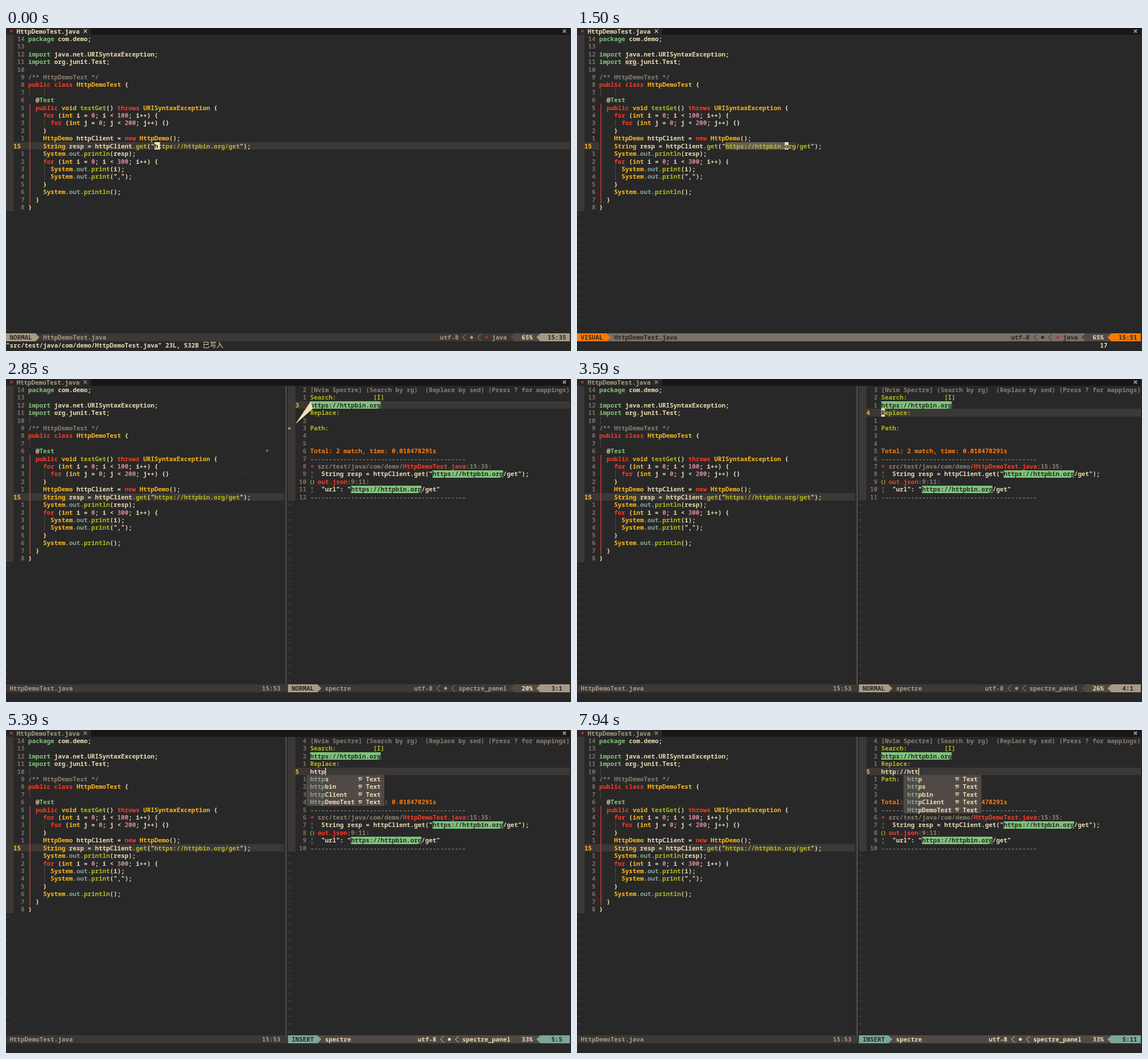
Animation, 990 px wide and 566 px high, one loop 8000 ms. Source, as an HTML page with a canvas:

```html
<!DOCTYPE html>
<html lang="en">
<head>
<meta charset="utf-8">
<title>Editor search and replace</title>
<style>
html, body { margin: 0; width: 100%; height: 100%; overflow: hidden; background: #282828; }
canvas { display: block; }
</style>
</head>
<body>
<canvas id="stage" width="990" height="566"></canvas>
<script>
(() => {
const g = document.getElementById('stage').getContext('2d');
const LOOP = 8000, CW = 6.5, RH = 13.415, COLS = 152;
const FONT = '600 10.833px "Noto Sans Mono", "DejaVu Sans Mono", monospace';
const BG = '#282828', BG1 = '#3c3836', BG2 = '#504945', BG3 = '#665c54', FG = '#ebdbb2';
const HIT = '#7fc37a', CURSOR = '#f3dfb4', JAVA = '#a5343b';
const INK = {
  f: FG, r: '#fb3a26', y: '#fdb81f', g: '#b4b81f', a: '#83c07a', b: '#83a598', p: '#d3869b',
  c: '#8b7d70', n: '#7c6f64', o: '#fe7a0e', d: '#282828', s: '#a89984'
};
const SITE = 'https://httpbin.org';

// "~x" switches the ink to colour x
const CODE = [
  '~apackage ~fcom.demo;',
  '',
  '~aimport ~fjava.net.URISyntaxException;',
  '~aimport ~forg.junit.Test;',
  '',
  '~c/** HttpDemoTest */',
  '~rpublic class ~yHttpDemoTest ~f{',
  '',
  '  @~aTest',
  '  ~rpublic ~yvoid ~gtestGet~f() ~rthrows ~yURISyntaxException ~f{',
  '    ~rfor ~f(~yint ~fi = ~p0~f; i < ~p100~f; i++) {',
  '      ~rfor ~f(~yint ~fj = ~p0~f; j < ~p200~f; j++) {}',
  '    }',
  '    ~yHttpDemo ~fhttpClient = ~rnew ~yHttpDemo~f();',
  '    ~yString ~fresp = httpClient~b.~gget~f("~g' + SITE + '/get~f");',
  '    ~ySystem~b.out.~gprintln~f(resp);',
  '    ~rfor ~f(~yint ~fi = ~p0~f; i < ~p300~f; i++) {',
  '      ~ySystem~b.out.~gprint~f(i);',
  '      ~ySystem~b.out.~gprint~f(",");',
  '    }',
  '    ~ySystem~b.out.~gprintln~f();',
  '  }',
  '}'
];
const RULE = '~c' + '-'.repeat(42);
const PANEL = [
  '~c[Nvim Spectre] (Search by rg)  (Replace by sed) (Press ? for mappings)',
  '~gSearch:          [I]',
  '~d' + SITE,
  '~gReplace:',
  '',
  '~gPath:',
  '',
  '',
  '~oTotal: 2 match, time: 0.018478291s',
  RULE,
  '  ~csrc/test/java/com/demo/~rHttpDemoTest.java~c:15:35:',
  '~c¦  ~fString resp = httpClient.get("~d' + SITE + '~f/get");',
  '  ~rout.json~c:9:11:',
  '~c¦  ~f"url": "~d' + SITE + '~f/get"',
  RULE
];
const WORDS = ['http', 'https', 'httpbin', 'httpClient', 'HttpDemoTest'];
const MODES = {
  NORMAL: { main: '#a89984', bar: BG1, ink: 's' },
  VISUAL: { main: '#ff7800', bar: '#7c6f64', ink: 'd' },
  INSERT: { main: '#7ba698', bar: BG2, ink: 'f' }
};

// Each list holds [start time, value]
const leftCol = [[0, 34], [750, 39], [900, 42], [1200, 49], [1500, 50], [1800, 52]];
const panelRow = [[0, 3], [3590, 4], [4040, 5]];
const typed = [[0, 0], [4490, 1], [4640, 2], [4940, 3], [5090, 4], [6590, 5], [6890, 6], [7040, 7], [7340, 8], [7790, 9], [7940, 10]];
const pending = [[0, ''], [300, 'v'], [600, null], [2400, '<20>'], [2550, '<20>s']];
const at = (list, t) => list.reduce((v, [start, next]) => t >= start ? next : v, list[0][1]);

const rowY = row => row * RH - 1.2;
function rect(x, y, w, h, color) {
  g.fillStyle = color;
  g.fillRect(x, y, w, h);
}
function cells(col, row, n, color, rows = 1) {
  const y = Math.round(rowY(row));
  rect(col * CW, y, n * CW, Math.round(rowY(row + rows)) - y, color);
}
function put(col, row, text, ink = 'f') {
  for (const part of ('~' + ink + text).split('~').slice(1)) {
    const s = part.slice(1);
    g.fillStyle = INK[part[0]];
    g.fillText(s, col * CW, rowY(row) + 10.7);
    col += s.length;
  }
}
function trace(pts) {
  g.beginPath();
  pts.forEach(p => g.lineTo(...p));
}
function shape(color, ...pts) {
  g.fillStyle = color;
  trace(pts);
  g.fill();
}
function line(color, width, ...pts) {
  g.strokeStyle = color;
  g.lineWidth = width;
  trace(pts);
  g.stroke();
}
function dot(x, y, r, color) {
  g.fillStyle = color;
  g.beginPath();
  g.arc(x, y, r, 0, 7);
  g.fill();
}
function cross(x, y, r, color, width) {
  line(color, width, [x - r, y - r], [x + r, y + r]);
  line(color, width, [x - r, y + r], [x + r, y - r]);
}
function arrow(col, dir, color) {
  const x = col * CW, y = rowY(40), base = dir > 0 ? x : x + CW, tip = dir > 0 ? x + CW : x;
  shape(color, [base, y], [tip, y + RH / 2], [base, y + RH]);
}
function chevron(col, color) {
  const x = col * CW, y = rowY(40);
  line(color, 1, [x + CW, y + 1], [x + 1, y + RH / 2], [x + CW, y + RH - 1]);
}

function gutter(col, count, cur) {
  cells(col, 1, 2, BG1, count);
  for (let row = 1; row <= count; row++) {
    const n = String(Math.abs(row - cur));
    if (row === cur) put(col + 2, row, String(cur), 'y');
    else put(col + 6 - 1 - n.length, row, n, 'n');
  }
  g.fillStyle = BG2;
  for (let row = count + 1; row < 40; row++) g.fillText('~', col * CW, rowY(row) + 10.7);
}

function statusLine(col, mode, name, type, pct, pos) {
  const m = MODES[mode], color = INK[m.ink], end = mode === 'INSERT' ? 136 : 135;
  cells(col, 40, COLS - col, m.bar);
  cells(col, 40, 8, m.main);
  arrow(col + 8, 1, m.main);
  put(col + 1, 40, mode, 'd');
  put(col + 10, 40, name, m.ink);

  let c = end - type.length;
  put(c, 40, type, m.ink);
  if (type === 'java') {
    c -= 2;
    dot(c * CW + 3.5, rowY(40) + 6.7, 2.4, JAVA);
  }
  chevron(c - 2, color);
  dot((c - 4) * CW + 3.3, rowY(40) + 6.7, 2.6, color);
  chevron(c - 6, color);
  put(c - 12, 40, 'utf-8', m.ink);

  arrow(136, -1, BG2);
  cells(137, 40, 7, BG2);
  put(139, 40, pct + '%');
  arrow(143, -1, m.main);
  cells(144, 40, 8, m.main);
  put(pos[1] === ':' ? 147 : 146, 40, pos, 'd');
}

function tabLine(split) {
  rect(0, 0, COLS * CW, 12, '#171717');
  rect(0, 0, 149, 12, BG);
  dot(9.5, 5.5, 2.4, JAVA);
  put(18.5 / CW, 0, 'HttpDemoTest.java', split ? 's' : 'f');
  cross(139, 5.5, 2.8, split ? INK.s : FG, 1.2);
  cross(978.5, 5.5, 2.6, INK.s, 2);
}

function guides(split) {
  const bar = (x, row, n, color, w = 1) => rect(x, rowY(row), w, n * RH, color);
  bar(41, 10, 13, '#c93a2c', 1.5);
  bar(67, 12, 1, BG2);
  bar(67, 18, 2, BG2);
  bar(41, 8, 1, BG2);
  if (split) bar(41, 5, 1, BG2);
  else bar(67, 8, 1, BG2);
}

function editor(t, split) {
  const col = at(leftCol, t), visual = t >= 600 && !split;
  cells(0, 15, visual ? 6 : split ? 75 : COLS, BG1);
  gutter(0, 23, 15);
  if (visual) {
    if (t >= 1500) {
      cells(13, 4, 3, BG1);
      cells(56, 15, 3, BG1);
    }
    cells(40, 15, col - 33, BG3);
  }
  guides(split);
  CODE.forEach((s, i) => put(6, i + 1, s));
  if (split) return;

  cells(6 + col, 15, t < 150 ? 1.5 : 1, CURSOR);
  put(6 + col, 15, SITE[col - 34], 'd');
  statusLine(0, visual ? 'VISUAL' : 'NORMAL', 'HttpDemoTest.java', 'java', 65, '15:' + (col + 1));
  if (!visual) {
    put(0, 41, '"src/test/java/com/demo/HttpDemoTest.java" 23L, 532B');
    g.font = '500 12.2px "Noto Sans CJK SC", "Noto Sans CJK", sans-serif';
    put(53, 41, '已写入');
    g.font = FONT;
  }
  put(141, 41, at(pending, t) ?? String(col - 33));
}

function popup(col, words, hit) {
  cells(col, 6, 21, BG2, words.length);
  words.forEach((word, i) => {
    const row = 6 + i, x = (col + 14) * CW, y = rowY(row) + 4;
    put(col + 1, row, '~b' + word.slice(0, hit) + '~f' + word.slice(hit));
    line(FG, 1.2, [x, y + 2.5], [x + 1, y], [x + 6.5, y]);
    line(FG, 1.2, [x + 2.5, y], [x + 2, y + 6]);
    line(FG, 1.2, [x + 4.5, y + 5], [x + 4.5, y + 2.5], [x + 6.5, y + 2.5]);
    put(col + 16, row, 'Text');
  });
}

function panel(t) {
  const cur = at(panelRow, t), n = at(typed, t), insert = t >= 4190;
  rect(490, 12, 1.5, rowY(40) - 12, BG3);
  cells(78, cur, COLS - 78, BG1);
  gutter(76, 15, cur);
  [[82, 3], [115, 12], [93, 14]].forEach(([c, r]) => cells(c, r, 19, HIT));
  PANEL.forEach((s, i) => put(82, i + 1, s));
  put(82, 5, 'http://htt'.slice(0, n));
  dot(536.5, rowY(11) + 6.7, 2.4, JAVA);
  g.font = '700 8px "Noto Sans Mono", monospace';
  put(81.8, 12.95, '{}', 'g');
  g.font = FONT;

  if (n >= 2 && n <= 4) popup(81, WORDS.slice(1), n);
  if (n >= 9) popup(88, WORDS, n - 7);
  if (insert) rect(533 + n * CW, rowY(5) + 0.5, 1.5, RH - 1, FG);
  else if (t < 3000) shape(CURSOR, [507, 79], [532, 42], [534, 39], [537.5, 52]);
  else {
    cells(82, cur, 1, CURSOR);
    put(82, cur, ['h', 'R', ''][cur - 3], 'd');
  }

  cells(0, 40, 76, BG1);
  put(1, 40, 'HttpDemoTest.java', 's');
  put(69, 40, '15:53', 's');
  statusLine(76, insert ? 'INSERT' : 'NORMAL', 'spectre', 'spectre_panel', Math.floor(cur / 15 * 100), cur + ':' + (n + 1));

  // cursor dust fades away after the jump
  const fade = 1 - Math.floor((t - 2850) / 150) / 4;
  if (fade > 0) {
    g.globalAlpha = fade;
    dot(496.5, 86.5, 2.3 * fade, '#9d9279');
    dot(457.5, 125.5, 2 * fade, '#7d7564');
    dot(420, 166, 1.2 * fade, BG2);
    g.globalAlpha = 1;
  }
}

const begin = performance.now();
function draw() {
  const t = (performance.now() - begin) % LOOP, split = t >= 2850;
  g.font = FONT;
  rect(0, 0, 990, 566, BG);
  tabLine(split);
  editor(t, split);
  if (split) panel(t);
  requestAnimationFrame(draw);
}
draw();
})();
</script>
</body>
</html>
```
